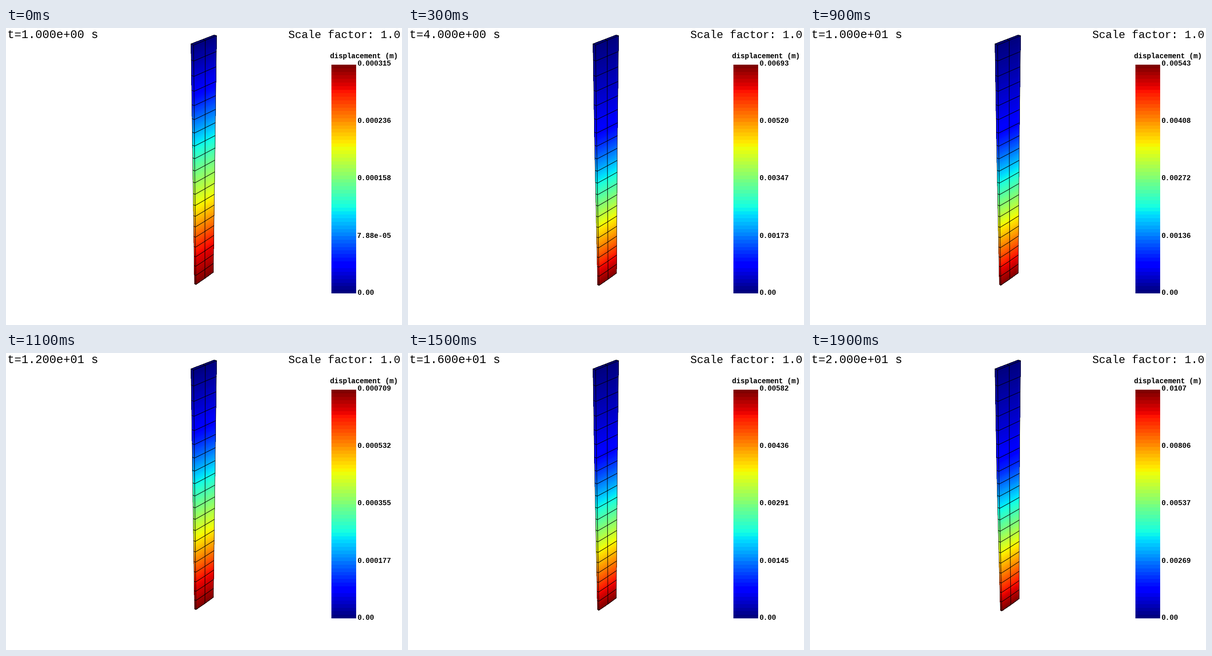
A matplotlib script that plays this animation: 864 by 648 pixels, repeating every 2000 ms.

```python
import numpy as np
import matplotlib.pyplot as plt
from matplotlib.animation import FuncAnimation
from matplotlib.collections import LineCollection, PolyCollection

W, H, DPI = 864, 648, 100
FRAMES, INTERVAL = 20, 100
ROWS, SUB = 20, 10
PX = 72 / DPI

# Peak displacement (m): yearly wave plus a slow drift through known times
KEY_T = np.array([1, 4, 8, 12, 14, 16, 20])
KEY_D = np.array([0.3152, 6.934, 10.16, 0.7093, 0.9857, 5.817, 10.745]) * 1e-3
D_MIN = KEY_D[0]


def wave(t):
    return 0.0109 * np.sin(np.pi * (t - 1) / 12) ** 2


def peak(t):
    return max(wave(t) + np.interp(t, KEY_T, KEY_D - wave(KEY_T)), D_MIN)


# Height fractions at which each level is reached, stretched and bent
LEVELS = [0, 0.125, 0.375, 0.5, 0.64, 0.89, 1]
STRETCH = np.array([0, 0.17, 0.36, 0.465, 0.6, 0.82, 1])
BEND = np.array([0, 0.33, 0.515, 0.605, 0.70, 0.905, 1])

# Vertical edges of the plate: outer left, front left, middle, right
TOP = np.array([[403.7, 34.7], [409.2, 37.3], [434.8, 26.8], [459.4, 17]])
BOTTOM = np.array([[411.3, 558], [414.2, 559.7], [433.9, 546.2], [452.3, 532.8]])
BACK = np.array([454.7, 15.2])
DEPTH = 0.356


def profile(d, s):
    w = min(1.08 * (d - D_MIN) / (d + 0.0007), 1)
    at = STRETCH + (BEND - STRETCH) * w
    nodes = np.linspace(0, 1, ROWS + 1)
    return np.interp(s, nodes, np.interp(nodes, at, LEVELS))


def grid(d, s):
    """Screen points, shape (len(s), 4, 2), and levels along the plate."""
    v = profile(d, s)
    u = (s * (1 + DEPTH) / (1 + DEPTH * s))[:, None, None]
    shift = v[:, None, None] * (d - D_MIN) * np.array([400, 300])
    return TOP + (BOTTOM - TOP) * u + shift, v


fig = plt.figure(figsize=(W / DPI, H / DPI), dpi=DPI, facecolor="white")
ax = fig.add_axes([0, 0, 1, 1])
ax.set_xlim(0, W)
ax.set_ylim(H, 0)
ax.axis("off")


def label(x, y, text, size, weight="normal"):
    return ax.text(x, y, text, fontsize=size * PX, family="Liberation Mono",
                   weight=weight, color="black", ha="left", va="baseline")


clock = label(3.4, 22, "", 25.4)
label(615.5, 22, "Scale factor: 1.0", 23.95)
label(707.3, 66, "displacement (m)", 15.5, "bold")
ticks = [label(766, y, "", 15.5, "bold") for y in (582, 457.5, 332.5, 207, 82)]

ax.pcolormesh([709.5, 764], np.linspace(579, 80, 65),
              np.linspace(0, 1, 64)[:, None], cmap="jet", vmin=0, vmax=1)
ax.set_xlim(0, W)
ax.set_ylim(H, 0)

skin = PolyCollection([], cmap="jet", linewidths=0, antialiaseds=False)
skin.set_clim(0, 1)
mesh = LineCollection([], colors="black", capstyle="round")
ax.add_collection(skin, autolim=False)
ax.add_collection(mesh, autolim=False)

S = np.linspace(0, 1, ROWS * SUB + 1)


def draw(i):
    t = i + 1
    d = peak(t)
    clock.set_text(f"t={t:.3e} s")
    for k, tick in enumerate(ticks):
        tick.set_text(f"{d * k / 4:#.3g}")

    p, v = grid(d, S)
    lid = [p[0, 0], BACK, p[0, 3], p[0, 1]]
    quads = np.stack([p[:-1, :-1], p[:-1, 1:], p[1:, 1:], p[1:, :-1]], axis=2)
    skin.set_verts([np.array(lid)] + list(quads.reshape(-1, 4, 2)))
    mid = (v[:-1] + v[1:]) / 2
    skin.set_array(np.concatenate([[0], np.repeat(mid, 3)]))

    rows = [p[k] for k in range(0, len(S), SUB)]
    cols = [p[:, c] for c in range(4)]
    rim = [np.array([p[0, 0], BACK, p[0, 3]]),
           np.array([p[0, 2], (p[0, 0] + BACK) / 2])]
    mesh.set_segments(rows + cols + rim)
    mesh.set_linewidths([PX * 1.05] * len(rows)
                        + [PX * w for w in (0.8, 1.1, 1.1, 0.8)]
                        + [PX] * len(rim))
    return [clock, skin, mesh, *ticks]


anim = FuncAnimation(fig, draw, frames=FRAMES, interval=INTERVAL,
                     init_func=lambda: draw(0), repeat=True, repeat_delay=0,
                     blit=False)
plt.show()
```
